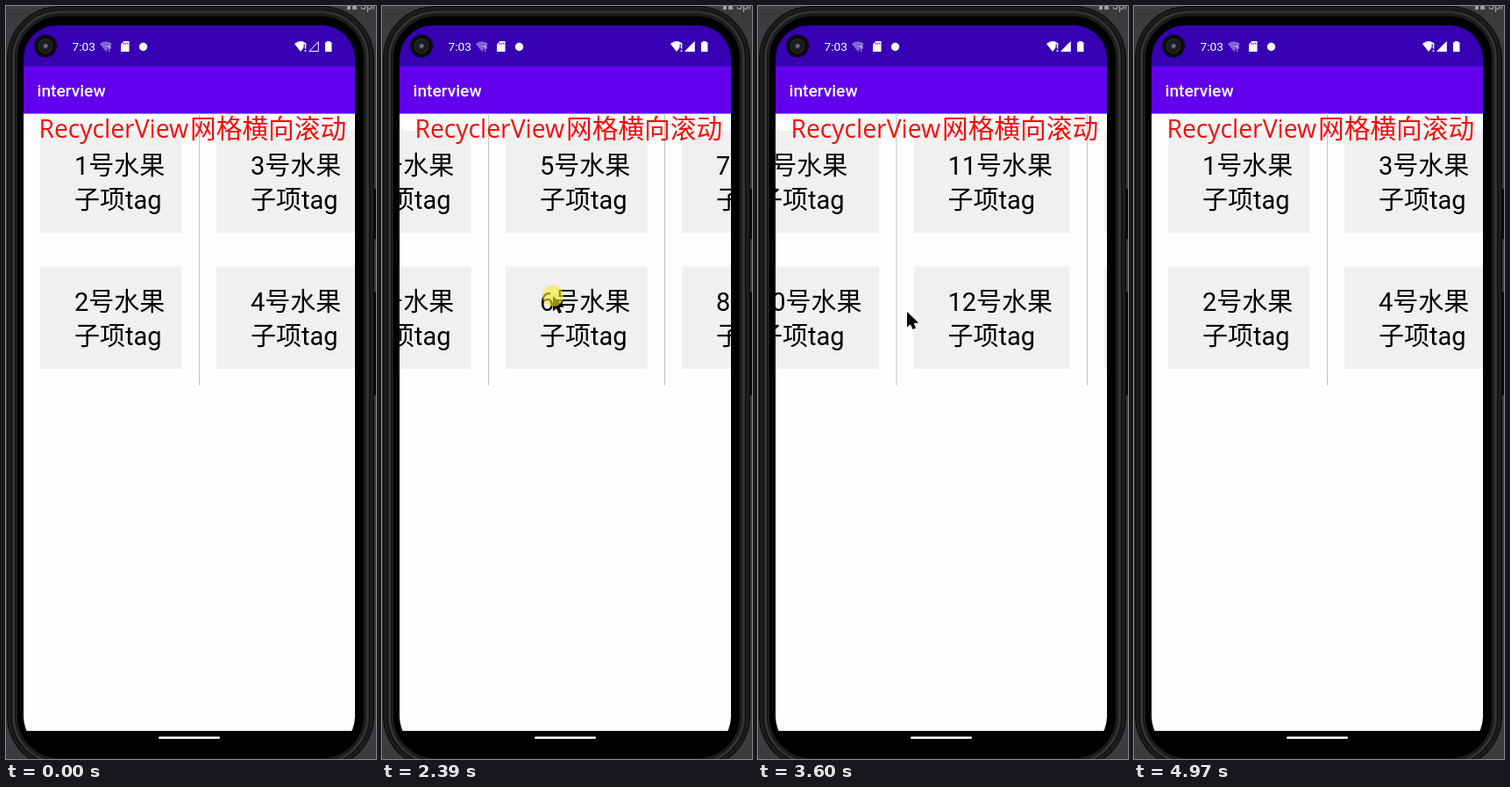
An HTML page that plays this animation: 422x857 px, repeating every 5320 ms.

```html
<!DOCTYPE html>
<html lang="zh">
<head>
<meta charset="utf-8">
<title>Grid scroll</title>
<style>
  html, body { margin: 0; width: 100%; height: 100%; overflow: hidden; background: #3a3c3e; }
  svg { display: block; width: 100%; height: 100%; }
  text { font-family: Roboto, "Noto Sans CJK SC", "Noto Sans CJK", sans-serif; white-space: pre; }
  .card text { font-size: 29px; fill: #000; }
  .title { fill: #f80a0a; font-size: 29.7px; }
  .title .latin { font: 28.3px "Open Sans", sans-serif; }
  .title .han { font-family: "Noto Sans CJK SC", "Noto Sans CJK", sans-serif; font-weight: 300; }
</style>
</head>
<body>
<svg viewBox="0 0 422 857">
  <defs>
    <clipPath id="screen"><rect x="20" y="22" width="378" height="825" rx="38"/></clipPath>
    <clipPath id="list"><rect x="20" y="122" width="378" height="310"/></clipPath>
  </defs>

  <!-- desktop and phone body -->
  <rect width="422" height="857" fill="#3a3c3e"/>
  <rect y="9" width="422" height="1" fill="#303234"/>
  <path d="M389 0h4v4h-4zM395 0h5v4h-5z" fill="#9a9da0"/>
  <text x="404" y="4" font-size="12" fill="#a9abad">Spl</text>
  <path d="M418 208h4v57h-4zM418 325h4v118h-4z" fill="#0c0c0c"/>
  <rect x="1" y="0" width="419" height="868" rx="60" fill="#0b0b0b"/>
  <g fill="none">
    <rect x="4" y="3" width="413" height="862" rx="57" stroke="#1c1c1c" stroke-width="4"/>
    <rect x="8.5" y="7" width="404" height="854" rx="53" stroke="#343434" stroke-width="3"/>
    <rect x="11.5" y="10" width="398" height="848" rx="50" stroke="#1d1d1d" stroke-width="3"/>
  </g>
  <rect x="13" y="12" width="395" height="844" rx="48" fill="#000"/>

  <!-- screen -->
  <g clip-path="url(#screen)">
    <rect x="20" y="22" width="378" height="47" fill="#3700b3"/>
    <rect x="20" y="69" width="378" height="53.5" fill="#6200ee"/>
    <rect x="20" y="122.5" width="378" height="702.5" fill="#fdfdfd"/>
    <rect x="20" y="825" width="378" height="32" fill="#000"/>
  </g>
  <rect x="174" y="831.5" width="70" height="2.5" rx="1.2" fill="#fff"/>

  <!-- status bar -->
  <circle cx="45" cy="45.5" r="13" fill="#0b0b0d"/>
  <circle cx="45" cy="45.5" r="8" fill="#1b1b1d" stroke="#323234"/>
  <circle cx="45" cy="45.5" r="3" fill="#4b4a4c"/>
  <circle cx="45.5" cy="45.5" r="1.2" fill="#999"/>
  <text x="75.5" y="51" font-size="13.7" fill="#fff">7:03</text>
  <path d="M107 43Q114 37.5 121 43L114 52Z" fill="#8066d1"/>
  <text x="115.5" y="52" font-size="9" font-weight="700" fill="#cfc4ef">?</text>
  <path d="M134.5 40H140.5V52H131V43.5Z" fill="#fff"/>
  <path d="M134.5 41.5v2.5M136.7 41.5v2.5M138.8 41.5v2.5" stroke="#3700b3" stroke-width=".8"/>
  <circle cx="156.5" cy="46.5" r="4.7" fill="#fff"/>
  <path d="M329 43Q336 37 343 43L336 52Z" fill="#fff"/>
  <path d="M341.2 43.5v5M341.2 50v2" stroke="#3700b3" stroke-width="3.4"/>
  <path d="M341.5 43.5v5M341.5 50v2" stroke="#fff" stroke-width="1.5"/>
  <path id="signal" d="M356.3 40.8V51.5H345.8Z" stroke="#fff"/>
  <path d="M366 40h3.5v1.3h2V52h-7.5V41.3h2Z" fill="#fff"/>
  <text x="35.5" y="103" font-size="19.2" font-weight="500" fill="#fff">interview</text>

  <g clip-path="url(#list)"><g id="row"></g></g>

  <text class="title" y="150"><tspan class="latin" x="37.5">RecyclerView</tspan><tspan class="han" x="210">网格横向滚动</tspan></text>

  <g id="cursor">
    <path d="M0 0V17.5L3.9 14.2L6.6 20L10 18.4L7.6 13L13 12.6Z" fill="#050505"/>
    <circle id="halo" r="12" fill="#f8e82a" fill-opacity=".6"/>
  </g>
</svg>
<script>
const LOOP = 5320, STEP = 172.3;
const $ = id => document.getElementById(id);
const [row, signal, cursor, halo] = ['row', 'signal', 'cursor', 'halo'].map($);

// [step, value...]
const scrollKeys = [[6, 0], [7, 25], [8, 110], [9, 169.3], [10, 230], [11, 245], [12, 300],
  [13, 480], [14, 680], [15, 722], [16, 750], [17, 820], [18, 865], [19, 883],
  [20, 790], [21, 480], [22, 150], [23, 0]];
const stretchKeys = [[22, 1], [23, 1.01], [24, 1.005], [25, 1]];
const cursorKeys = [[1, 415, 835], [2, 380, 690], [5, 243, 362], [6, 285, 345], [7, 270, 340],
  [9, 108, 328], [11, 280, 330], [13, 110, 330], [15, 244, 325], [17, 190, 335],
  [18, 165, 345], [19, 170, 348], [20, 168, 345], [22, 262, 335], [23, 259, 335],
  [24, 255, 420], [26, 300, 790]];
const presses = [[6, 8], [11, 12], [15, 17], [20, 21]];

function card(x, y, width, n) {
  return `<g class="card" transform="translate(${x} ${y})">
    <rect width="${width}" height="116.5" fill="#f0f0f0"/>
    <text x="39" y="50">${n}号水果</text><text x="39" y="89">子项tag</text></g>`;
}

function buildRow() {
  let x = 20, html = '';
  for (let n = 1; n < 20; n += 2) {
    const width = n < 9 ? 161.5 : 178;
    html += card(x + 19, 142, width, n) + card(x + 19, 296.5, width, n + 1);
    x += width + 39.5;
    html += `<rect x="${x - 1}" y="122" width="1" height="310" fill="#c2c2c2"/>`;
  }
  row.innerHTML = html;
}

function at(keys, n) {
  const i = keys.findIndex(k => k[0] > n);
  if (i === 0) return keys[0].slice(1);
  if (i < 0) return keys[keys.length - 1].slice(1);
  const a = keys[i - 1], b = keys[i], u = (n - a[0]) / (b[0] - a[0]);
  return a.slice(1).map((v, j) => v + (b[j + 1] - v) * u);
}

function draw(t) {
  const n = t < 490 ? 0 : 1 + Math.floor((t - 484) / STEP);
  const [scroll] = at(scrollKeys, n), [stretch] = at(stretchKeys, n), [x, y] = at(cursorKeys, n);
  row.setAttribute('transform', `translate(20 0) scale(${stretch} 1) translate(${-20 - scroll} 0)`);
  signal.setAttribute('fill', n ? '#fff' : 'none');
  cursor.setAttribute('transform', `translate(${x} ${y})`);
  cursor.style.display = n > 0 && n < 27 ? '' : 'none';
  halo.style.display = presses.some(([a, b]) => n >= a && n <= b) ? '' : 'none';
}

buildRow();
const start = performance.now();
function tick() {
  draw((performance.now() - start) % LOOP);
  requestAnimationFrame(tick);
}
tick();
</script>
</body>
</html>
```
